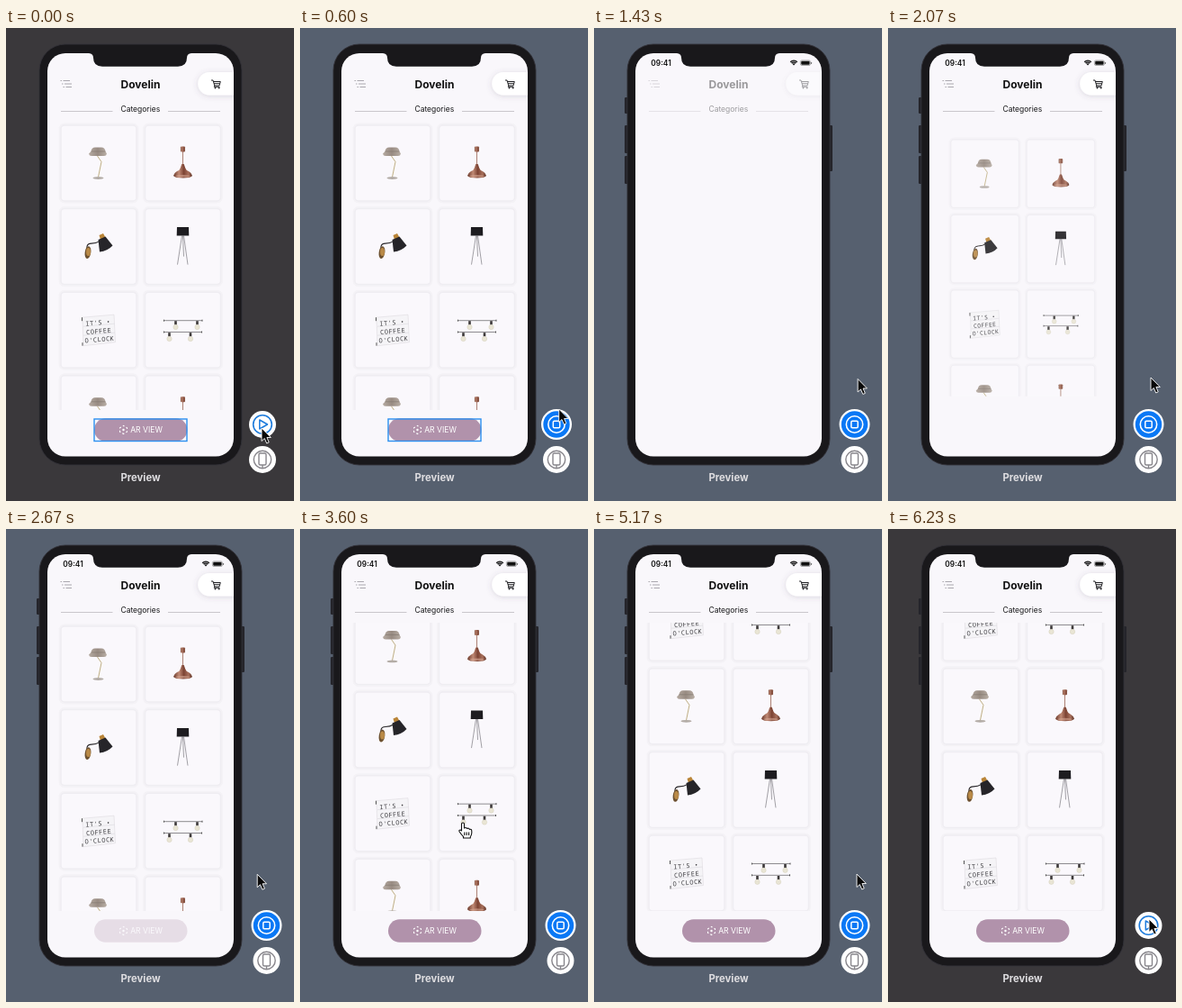
These frames come from a looping animation (320 by 525 pixels, 6260 ms). An HTML page:

```html
<!DOCTYPE html>
<html lang="en">
<head>
<meta charset="utf-8">
<title>Lamp shop preview</title>
<style>
html, body { margin: 0; width: 100%; height: 100%; overflow: hidden; background: #3a383b; }
svg { display: block; width: 320px; height: 525px; }
text { font-family: Inter, Roboto, sans-serif; text-anchor: middle; }
.sign text { font: 7px "Noto Sans Mono", "DejaVu Sans Mono", monospace; letter-spacing: .5px; fill: #39383c; }
</style>
</head>
<body>
<svg viewBox="0 0 320 525" xmlns="http://www.w3.org/2000/svg">
  <defs>
    <clipPath id="screenClip"><rect x="46" y="28" width="207" height="447.500" rx="20"/></clipPath>
    <clipPath id="listClip"><rect x="46" y="104" width="207" height="320"/></clipPath>
    <filter id="soft" x="-40%" y="-50%" width="180%" height="200%">
      <feDropShadow dx="0" dy="1" stdDeviation="3" flood-color="#55506a" flood-opacity=".2"/>
    </filter>
    <linearGradient id="copper">
      <stop offset="0" stop-color="#6b3a2c"/><stop offset=".3" stop-color="#c08a75"/>
      <stop offset=".55" stop-color="#7d4434"/><stop offset=".8" stop-color="#a8705c"/><stop offset="1" stop-color="#5c3024"/>
    </linearGradient>
    <linearGradient id="taupe">
      <stop offset="0" stop-color="#b5aaa1"/><stop offset=".5" stop-color="#988b82"/><stop offset="1" stop-color="#b9afa6"/>
    </linearGradient>

    <g id="deskLamp">
      <path d="M-1.500 -8L3 -1.500L-.5 15.500" fill="none" stroke="#bfae82" stroke-width="1"/>
      <ellipse cx="-.5" cy="16.500" rx="6" ry="1.400" fill="#b3aca6"/>
      <path d="M-8.500 -13Q-8 -17.500 -4 -17.500H3Q7 -17.500 7.500 -13L9 -10.500Q8.500 -8 6 -8H-8Q-10.500 -8 -11 -10.500Z" fill="url(#taupe)"/>
      <path d="M-8.500 -13H7.500" stroke="#857a72" stroke-width=".7"/>
    </g>
    <g id="pendant">
      <path d="M0 -14V4" stroke="#99604e" stroke-width=".8"/>
      <rect x="-2.500" y="-18.500" width="5" height="6" rx="1" fill="url(#copper)"/>
      <path d="M-1.200 1H1.200L2.800 5.500Q3.500 8 6.500 9Q10 11 10.500 14Q9 16.500 0 16.500Q-9 16.500 -10.500 14Q-10 11 -6.500 9Q-3.500 8 -2.800 5.500Z" fill="url(#copper)"/>
      <ellipse cy="14.300" rx="8" ry="1.300" fill="#d7a894" opacity=".6"/>
    </g>
    <g id="wallLamp">
      <path d="M-13 4V0Q-12.500 -3.500 -8 -3.500Q-3 -3.500 1 -6" fill="none" stroke="#29272a" stroke-width="1.100"/>
      <ellipse cx="-12" cy="6.500" rx="3.300" ry="7" fill="#6d5130" transform="rotate(8 -12 6.500)"/>
      <ellipse cx="-11.500" cy="6" rx="2.500" ry="4.500" fill="#b98a48"/>
      <path d="M.5 -12.500L5 -14.500L7.500 -10L2 -7.500Z" fill="#b98437"/>
      <path d="M-.5 -7.500L7.500 -11L15.500 -1Q10 5 1 6Z" fill="#262529"/>
    </g>
    <g id="tripod">
      <path d="M-1 -12L-6 20M0 -12L1 11M1 -12L5.500 20" fill="none" stroke="#66646a" stroke-width=".6"/>
      <path d="M-6.500 -21.500H6.500L6.800 -12H-6.800Z" fill="#1d1c20"/>
    </g>
    <g id="lightBox">
      <path d="M-18 -14L17 -17L18.500 13.500L-17 17.500Z" fill="#f5f4f7" stroke="#dddbe0" stroke-width=".6"/>
      <path d="M-17 -4L17.500 -7M-17 6L18 3" stroke="#d5d3d9" stroke-width=".5"/>
      <path d="M-18.500 -14V-10M-18 14V17.500" stroke="#555" stroke-width="1"/>
      <g class="sign" transform="rotate(-5)">
        <text x="0" y="-5.700" xml:space="preserve">IT'S •</text>
        <text x="0" y="3.800">COFFEE</text>
        <text x="0" y="13">O'CLOCK</text>
      </g>
    </g>
    <g id="bulb">
      <rect x="-1.300" y="-7.500" width="2.600" height="4.300" fill="#3c3838"/>
      <circle r="2.700" cy="-.7" fill="#e9e5d5" stroke="#d0c9b3" stroke-width=".4"/>
    </g>
    <g id="stringLights">
      <path d="M-21 -10.500H21.500M-21 2.300H21" stroke="#5f5c60" stroke-width=".7"/>
      <path d="M-21 -11.500V-9.500M21.500 -11.500V-9.500M-21 1.300V3.300M21 1.300V3.300" stroke="#333" stroke-width=".8"/>
      <use href="#bulb" x="-8" y="-2.500"/><use href="#bulb" x="16" y="-2.500"/>
      <use href="#bulb" x="-15" y="10.500"/><use href="#bulb" x="8.500" y="10.500"/>
    </g>
  </defs>

  <rect id="bg" width="320" height="525"/>

  <g id="sides" fill="#25252b">
    <g id="leftKeys">
      <rect x="34" y="77" width="6" height="18" rx="1.200"/>
      <rect x="34" y="108" width="6" height="31" rx="1.200"/>
      <rect x="34" y="142" width="6" height="31" rx="1.200"/>
    </g>
    <rect id="rightKey" x="259" y="108" width="6" height="51" rx="1.200"/>
  </g>
  <rect x="37" y="18" width="225" height="467" rx="29" fill="#19181b" stroke="#333238" stroke-width=".9"/>
  <rect x="46" y="28" width="207" height="447.500" rx="20" fill="#f9f7fb"/>

  <g clip-path="url(#screenClip)">
    <g id="list"><g clip-path="url(#listClip)"><g id="rows"></g></g></g>

    <g id="header">
      <g stroke="#96939b" stroke-width=".8">
        <path d="M63.500 58.500H71M65 62H73M66.500 65.500H73"/>
        <path d="M60.500 58.500H62M62 62H63.500M63.500 65.500H65"/>
      </g>
      <text x="149.500" y="66.700" font-size="12" font-weight="700" fill="#111">Dovelin</text>
      <path d="M260 49H226A12.700 12.700 0 0 0 226 74.500H260Z" fill="#fff" filter="url(#soft)"/>
      <g fill="none" stroke="#202024" stroke-width="1">
        <path d="M228 58H230L231.800 64H237L238.300 59.500H230.500M231 61.700H237.500"/>
        <path d="M231.800 64L231.300 65.300H237.500"/>
      </g>
      <circle cx="232.500" cy="66.600" r=".9" fill="#202024"/><circle cx="236.700" cy="66.600" r=".9" fill="#202024"/>
      <path d="M61 92.500H118.500M180 92.500H238" stroke="#bdbac0" stroke-width=".8"/>
      <text x="149.300" y="93" font-size="8.500" fill="#18181a">Categories</text>
    </g>

    <g id="arButton">
      <rect x="98" y="433.300" width="103.500" height="25.400" rx="12.700" fill="#b192ab"/>
      <path d="M130.500 441.500L134.500 443.800V448.200L130.500 450.500L126.500 448.200V443.800Z" fill="none" stroke="#fff" stroke-width="1.100" stroke-dasharray="2.300 2.300" stroke-dashoffset="1.100"/>
      <circle cx="130.500" cy="446" r="1.200" fill="#fff"/>
      <text x="156" y="449.200" font-size="8.600" fill="#fff">AR VIEW</text>
    </g>
    <rect id="outline" x="98" y="434" width="103" height="24.500" fill="none" stroke="#2b8ff0" stroke-width="1.400"/>

    <g id="status" fill="#111">
      <text x="74.500" y="41.700" font-size="8.400" font-weight="600">09:41</text>
      <path d="M222 41.500L217.700 37.200A6.100 6.100 0 0 1 226.300 37.200Z"/>
      <path d="M218.600 38.600A4.800 4.800 0 0 1 225.400 38.600M220 40A2.800 2.800 0 0 1 224 40" fill="none" stroke="#f9f7fb" stroke-width=".6"/>
      <rect x="229.400" y="36" width="11" height="5.500" rx="1.500" fill="none" stroke="#777" stroke-width=".6"/>
      <rect x="230.200" y="36.800" width="9.400" height="3.900" rx=".9"/>
      <rect x="241" y="37.700" width="1" height="2.200" rx=".5" fill="#777"/>
    </g>
  </g>
  <path d="M92 27H206V28Q201 28.500 201 33Q201 42.700 191 42.700H107Q97 42.700 97 33Q97 28.500 92 28Z" fill="#19181b"/>

  <text x="149.500" y="503.200" font-size="11.300" font-weight="700" fill="#dedde0">Preview</text>

  <g id="controls">
    <g id="playIcon">
      <circle r="15" fill="#fff"/>
      <circle r="10.300" fill="none" stroke="#1d7bdc" stroke-width="1.600"/>
      <path d="M-3.200 -5L5.500 0L-3.200 5Z" fill="none" stroke="#1d7bdc" stroke-width="1.500" stroke-linejoin="round"/>
    </g>
    <g id="stopIcon">
      <circle r="17" fill="#fff"/><circle r="14.700" fill="#0a78f5"/>
      <circle r="9.200" fill="none" stroke="#fff" stroke-width="1.600"/>
      <rect x="-3.700" y="-3.700" width="7.400" height="7.400" rx="1.200" fill="none" stroke="#fff" stroke-width="1.500"/>
    </g>
    <g transform="translate(0 39)">
      <circle r="15" fill="#fff"/>
      <g fill="#fff" stroke="#88868c" stroke-width="1.400">
        <circle r="9.700"/>
        <rect x="-4" y="-7" width="8" height="13" rx="1.500"/>
      </g>
      <path d="M0 6V9.500" stroke="#88868c" stroke-width="1.400"/>
    </g>
  </g>

  <path id="arrow" d="M0 0V14.500L3.300 11.500L5.700 17L8.200 15.900L5.900 10.500H10.300Z" fill="#080808" stroke="#fff" stroke-width=".9" stroke-linejoin="round"/>
  <path id="hand" d="M-1.500 1.500Q-1.500 0 0 0Q1.500 0 1.500 1.500V6Q3.800 4.700 4.500 6.500Q6.700 5.600 7.300 7.400Q9.800 6.700 9.800 9.500V11.500Q9.500 14 8.300 15.500V17H.5V15.500Q-1.500 13.500 -4 9.800Q-4.500 8 -2.800 8Q-2 8.200 -1.500 9Z M1.800 10.500V14M4.200 10.500V14M6.600 10.500V14" fill="#fff" stroke="#111" stroke-width="1.100" stroke-linejoin="round"/>
</svg>
<script>
const LOOP = 6260, PITCH = 92.6;
const el = id => document.getElementById(id);
const set = (id, name, value) => el(id).setAttribute(name, value);
const fade = (id, value) => set(id, "opacity", value.toFixed(3));
const move = (id, x, y) => set(id, "transform", `translate(${x.toFixed(2)} ${y.toFixed(2)})`);

const clamp = v => Math.max(0, Math.min(1, v));
const linear = u => u;
const smooth = u => u * u * (3 - 2 * u);
const easeOut = u => 1 - (1 - u) ** 3;
const cubic = u => u < .5 ? 4 * u ** 3 : 1 - 4 * (1 - u) ** 3;
const span = (t, a, b, ease = smooth) => ease(clamp((t - a) / (b - a)));
const lerp = (a, b, u) => a + (b - a) * u;

// Keys are [time, value, ...]; values ease between neighbouring keys.
function track(keys, t) {
  let i = 0;
  while (i < keys.length - 2 && t >= keys[i + 1][0]) i++;
  const [a, b] = [keys[i], keys[i + 1]];
  const u = span(t, a[0], b[0]);
  return a.slice(1).map((v, k) => lerp(v, b[k + 1], u));
}

const products = [["deskLamp", "pendant"], ["wallLamp", "tripod"], ["lightBox", "stringLights"]];
const tile = (name, x, y) => `<g transform="translate(${x} ${y})">
  <rect x="-42.500" y="-42.500" width="85" height="85" rx="4.500" fill="none" stroke="#f4f2f6" stroke-width="4"/>
  <rect x="-42" y="-42" width="84" height="84" rx="4" fill="#faf8fc" stroke="#efedf2" stroke-width="1.500"/>
  <use href="#${name}"/></g>`;
el("rows").innerHTML = Array.from({ length: 6 }, (_, i) =>
  products[i % 3].map((name, k) => tile(name, 103 + k * 93.5, 150 + i * PITCH)).join("")).join("");

const arrowPath = [
  [0, 284, 444], [380, 284, 444], [900, 293.5, 390], [1200, 293.5, 390],
  [1900, 292, 388], [2600, 292, 388], [2860, 222, 362], [4280, 326, 372],
  [4500, 326, 372], [4720, 292, 386], [5100, 292, 383], [5380, 292, 383],
  [5800, 290, 433], [LOOP, 290, 433]
];
const handPath = [[2860, 222, 362], [3120, 181, 345.5], [4130, 181, 106], [4300, 332, 300]];

function scrollAt(t) {
  if (t < 3870) return 240 * span(t, 3500, 3870, cubic);
  if (t < 4370) return lerp(240, 260, span(t, 4130, 4340));
  return lerp(260, 231, span(t, 4380, 5000, easeOut));
}

function draw(t) {
  const run = span(t, 30, 330) * (1 - span(t, 6000, 6220));
  const mix = [[58, 86], [56, 96], [59, 111]].map(([a, b]) => Math.round(lerp(a, b, run)));
  set("bg", "fill", `rgb(${mix})`);

  const leave = span(t, 1190, 1270, linear);
  const gone = 1 - leave;
  const keys = span(t, 1180, 1290);
  move("leftKeys", 4 * (1 - keys), 0);
  move("rightKey", -4 * (1 - keys), 0);
  move("controls", 285 + 4.5 * keys, 440);

  fade("status", leave);
  fade("header", gone + span(t, 1300, 1600));
  fade("outline", gone);
  fade("arButton", gone + span(t, 2560, 2900));
  fade("list", gone + span(t, 1790, 2140));

  const s = t < 1280 ? 1 : lerp(.82, 1, span(t, 1790, 2390));
  set("list", "transform", `translate(150 268) scale(${s.toFixed(4)}) translate(-150 -268)`);
  const scroll = scrollAt(t);
  move("rows", 0, -scroll);

  const stop = span(t, 30, 200) * (1 - span(t, 6000, 6160));
  fade("playIcon", 1 - stop);
  fade("stopIcon", stop);

  const pointing = t >= 2860 && t < 4300;
  fade("arrow", pointing ? 0 : 1);
  fade("hand", pointing ? 1 : 0);
  move("arrow", ...track(arrowPath, t));
  const [hx, hy] = t >= 3120 && t < 4130 ? [181, 345.5 - scroll] : track(handPath, t);
  move("hand", hx, hy);
}

const start = performance.now();
function tick() {
  draw((performance.now() - start) % LOOP);
  requestAnimationFrame(tick);
}
draw(0);
requestAnimationFrame(tick);
</script>
</body>
</html>
```
